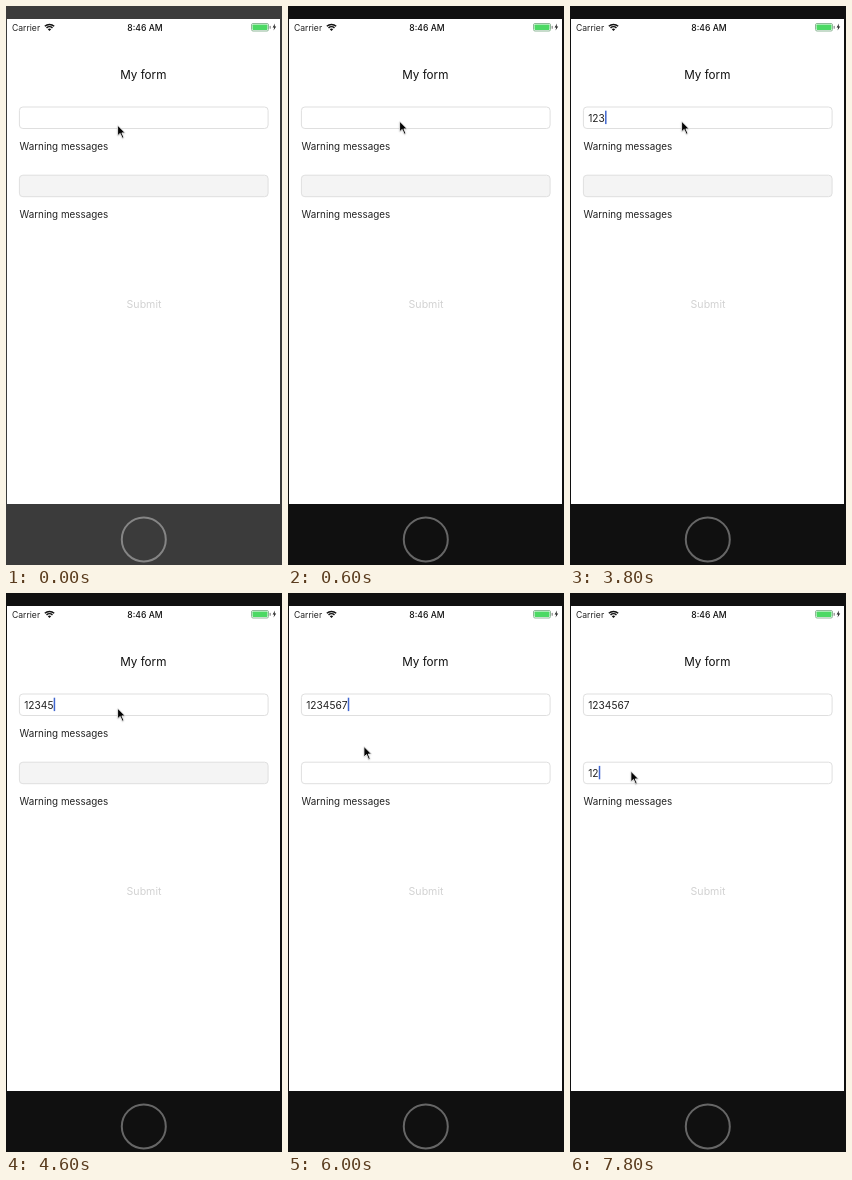
Write an HTML page with a canvas that moves like this. It is 276x559 px and loops after 8 s.

```html
<!DOCTYPE html>
<html lang="en">
<head>
<meta charset="utf-8">
<title>My form</title>
<style>
  html, body { margin: 0; width: 100%; height: 100%; overflow: hidden; background: #101010; }
  canvas { display: block; width: 276px; height: 559px; }
</style>
</head>
<body>
<canvas id="stage"></canvas>
<script>
const W = 276, H = 559, LOOP = 8000, STEP = 200;
const canvas = document.getElementById('stage');
const ctx = canvas.getContext('2d');
const dpr = window.devicePixelRatio || 1;
canvas.width = W * dpr;
canvas.height = H * dpr;

const clamp = (v, lo, hi) => Math.min(hi, Math.max(lo, v));
const easeOut = (u, power) => 1 - (1 - u) ** power;
const mix = (a, b, u) => a + (b - a) * u;

// Typing speeds up from one key per 600 ms to one per 400 ms.
const firstKeys = t => clamp(Math.floor(Math.max((t - 2000) / 600, (t - 2600) / 400)), 0, 7);
const secondKeys = t => clamp(Math.floor((t - 7000) / 400), 0, 2);

function firstCaret(t) {
  if (t < 1200 || t >= 6400) return 0;
  const blink = t >= 2400 && t < 2600;
  return blink || t >= 6200 ? 0.3 : 1;
}

function pointer(t) {
  const u = clamp((t - 5800) / 600, 0, 1);
  const drop = t < 400 ? 4 : 0;
  return [mix(111.2, 60.5, easeOut(u, 3)), mix(114.2, 177.2, easeOut(u, 2.3)) + drop];
}

function text(str, x, y, size, color = '#222', align = 'left', weight = 400) {
  ctx.font = `${weight} ${size}px Inter, "Liberation Sans", sans-serif`;
  ctx.textAlign = align;
  ctx.fillStyle = color;
  ctx.fillText(str, x, y);
}

function box(x, y, w, h, r, fill, stroke) {
  ctx.beginPath();
  ctx.roundRect(x, y, w, h, r);
  ctx.fillStyle = fill;
  ctx.fill();
  if (!stroke) return;
  ctx.strokeStyle = stroke;
  ctx.lineWidth = 1;
  ctx.stroke();
}

function shape(points, x, y, fill) {
  ctx.beginPath();
  for (const [px, py] of points) ctx.lineTo(x + px, y + py);
  ctx.closePath();
  ctx.fillStyle = fill;
  ctx.fill();
}

function bezel(lit) {
  ctx.fillStyle = lit ? '#3b3b3b' : '#101010';
  ctx.fillRect(0, 0, W, H);
  ctx.fillStyle = '#fff';
  ctx.fillRect(1, 13, 273, 485);
  ctx.beginPath();
  ctx.arc(137.8, 533.4, 22, 0, Math.PI * 2);
  ctx.strokeStyle = lit ? '#858585' : '#666';
  ctx.lineWidth = 2;
  ctx.stroke();
}

function wifi(x, y) {
  const from = -Math.PI * 0.75, to = -Math.PI * 0.25;
  ctx.strokeStyle = ctx.fillStyle = '#111';
  ctx.lineWidth = 1.5;
  for (const r of [6.6, 4.2]) {
    ctx.beginPath();
    ctx.arc(x, y, r, from, to);
    ctx.stroke();
  }
  ctx.beginPath();
  ctx.moveTo(x, y);
  ctx.arc(x, y, 2.4, from, to);
  ctx.fill();
}

function statusBar() {
  text('Carrier', 6, 24.5, 8.6);
  wifi(43.5, 25);
  text('8:46 AM', 139, 24.5, 8.6, '#111', 'center', 500);
  box(245.5, 17.5, 17, 7.5, 1.5, '#fff', '#8fb898');
  box(246.5, 18.5, 15, 5.5, 0.8, '#4cd964');
  box(263.6, 19.8, 1.2, 3, 0.6, '#8a8a8a');
  shape([[2.4, 0], [0, 4], [1.6, 4], [0.9, 7], [3.6, 2.8], [2, 2.8]], 266.6, 17.6, '#222');
}

function field(y, str, caret, enabled) {
  box(13.4, y, 248.7, 21.5, 3.5, enabled ? '#fff' : '#f4f4f4', '#dfdfdf');
  text(str, 18.2, y + 14.5, 10.2);
  ctx.globalAlpha = caret;
  ctx.fillStyle = '#4267cf';
  ctx.fillRect(18.4 + ctx.measureText(str).width, y + 3.7, 1.5, 13.4);
  ctx.globalAlpha = 1;
}

function arrow([x, y]) {
  const outline = [[0.4, 1], [0.4, 11.6], [3, 9.2], [5.1, 14], [6.7, 13.3], [4.7, 8.7], [8, 8.7]];
  ctx.save();
  ctx.shadowColor = 'rgba(0,0,0,.35)';
  ctx.shadowBlur = 1.5 * dpr;
  ctx.shadowOffsetY = 0.5 * dpr;
  shape(outline, x, y, '#050505');
  ctx.restore();
  ctx.strokeStyle = '#fff';
  ctx.lineWidth = 0.8;
  ctx.stroke();
}

function draw(now) {
  // The screen refreshes five times a second.
  const t = Math.floor((now % LOOP) / STEP) * STEP;
  const typed = firstKeys(t);
  const valid = typed >= 6;
  ctx.setTransform(dpr, 0, 0, dpr, 0, 0);
  bezel(t < 600);
  statusBar();
  text('My form', 137.3, 73, 11.7, '#111', 'center');
  field(101, '1234567'.slice(0, typed), firstCaret(t), true);
  if (!valid) text('Warning messages', 13.5, 143.8, 9.85);
  field(169.2, '12'.slice(0, secondKeys(t)), t >= 6600 ? 1 : 0, valid);
  text('Warning messages', 13.5, 211.8, 9.85);
  text('Submit', 138, 302, 10.6, '#d2d2d2', 'center');
  arrow(pointer(t));
}

const begin = performance.now();
function frame() {
  draw(performance.now() - begin);
  requestAnimationFrame(frame);
}
frame();
</script>
</body>
</html>
```
